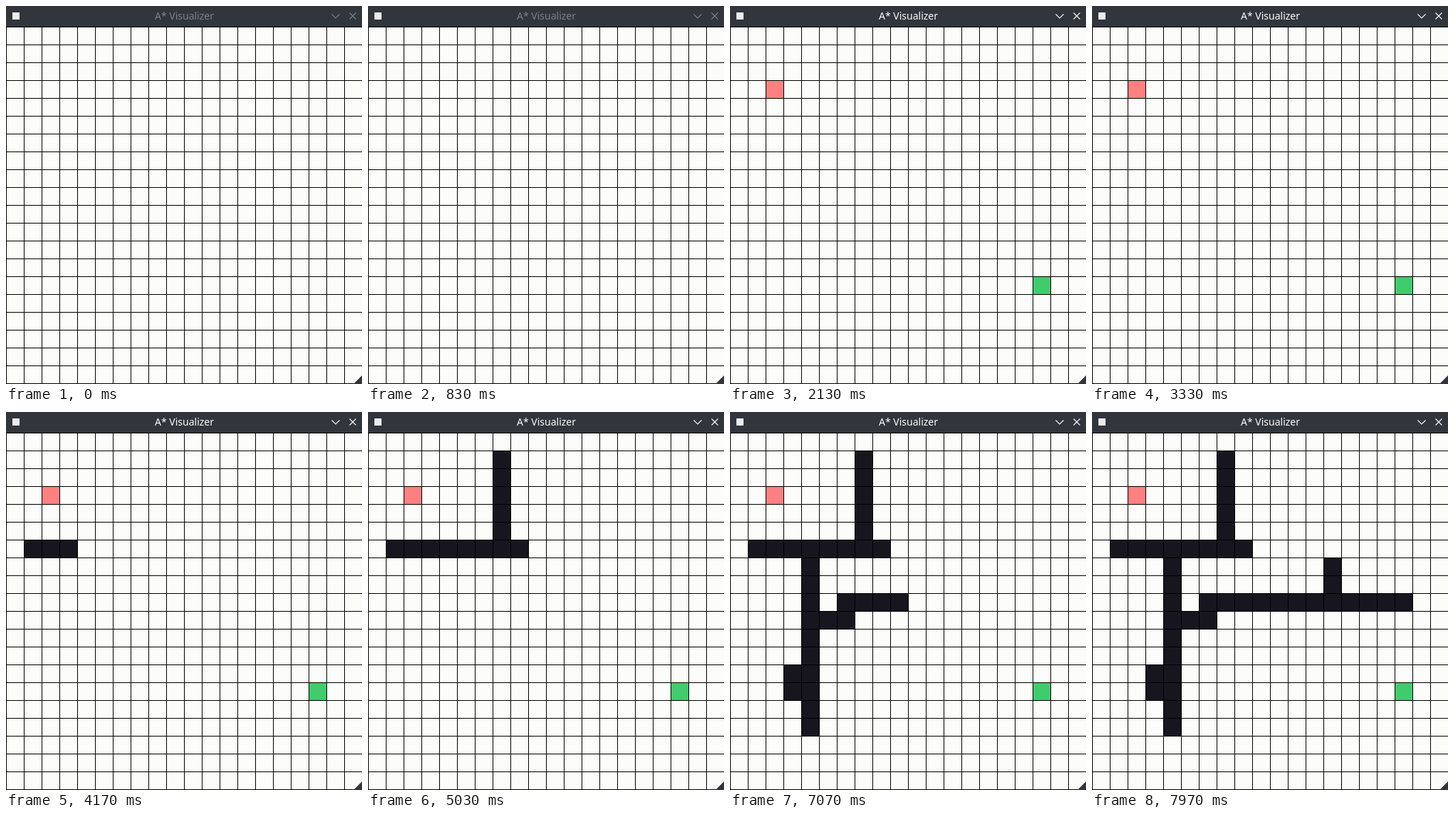
An HTML page with a canvas for the animation above (8000 ms loop, 500 px wide and 530 px high).

```html
<!DOCTYPE html>
<html lang="en">
<head>
<meta charset="utf-8">
<title>A* Visualizer</title>
<style>
  html, body { margin: 0; width: 100%; height: 100%; overflow: hidden; background: #fcfdfa; }
  canvas { display: block; }
</style>
</head>
<body>
<canvas id="stage" width="500" height="530"></canvas>
<script>
const ctx = document.getElementById('stage').getContext('2d');
const LOOP = 8000, CELL = 25, BAR = 29;
const COLOR = {
  bar: '#31363d', paper: '#fcfdfa', line: '#000000',
  wall: '#17161f', start: '#ff8080', goal: '#40cc6c'
};

// Each stroke: begin and end time, then the corner cells the pointer drags through.
const strokes = [
  [4030, 4430, [[1, 6], [8, 6]]],
  [4640, 4900, [[7, 5], [7, 1]]],
  [5530, 6230, [[4, 7], [4, 13], [3, 13], [3, 14], [4, 14], [4, 16]]],
  [6800, 7450, [[5, 10], [6, 10], [6, 9], [17, 9]]],
  [7660, 7830, [[13, 8], [13, 7]]]
];

function cellsAlong(points) {
  let [x, y] = points[0];
  const cells = [[x, y]];
  for (const [tx, ty] of points.slice(1)) {
    while (x !== tx || y !== ty) {
      x += Math.sign(tx - x);
      y += Math.sign(ty - y);
      cells.push([x, y]);
    }
  }
  return cells;
}

const walls = strokes.flatMap(([from, to, points]) => {
  const cells = cellsAlong(points);
  return cells.map(([x, y], i) => ({ x, y, at: from + (to - from) * i / (cells.length - 1) }));
});

function fillCell(x, y, color) {
  ctx.fillStyle = color;
  ctx.fillRect(x * CELL, BAR + y * CELL, CELL, CELL);
}

function polyline(...points) {
  ctx.beginPath();
  points.forEach(([x, y]) => ctx.lineTo(x, y));
  ctx.stroke();
}

function drawBar(focus) {
  ctx.fillStyle = COLOR.bar;
  ctx.fillRect(0, 0, 500, BAR);

  ctx.fillStyle = '#ececec';
  ctx.fillRect(9, 9, 10, 10);

  const mix = (a, b) => Math.round(a + (b - a) * focus);
  const ink = `rgb(${mix(126, 252)},${mix(130, 252)},${mix(134, 252)})`;
  ctx.fillStyle = ink;
  ctx.font = '14px "Noto Sans", sans-serif';
  ctx.textAlign = 'center';
  ctx.fillText('A* Visualizer', 250.5, 19);

  ctx.strokeStyle = ink;
  ctx.lineWidth = 1.1;
  polyline([457.5, 11.5], [463, 17], [468.5, 11.5]);
  polyline([482.5, 9.5], [491.5, 18.5]);
  polyline([491.5, 9.5], [482.5, 18.5]);
}

function drawGrid() {
  ctx.fillStyle = COLOR.line;
  for (let i = 0; i <= 20; i++) {
    ctx.fillRect(i * CELL, BAR, 1, 501);
    ctx.fillRect(0, BAR + i * CELL, 500, 1);
  }
}

function drawGrip() {
  ctx.fillStyle = COLOR.bar;
  ctx.beginPath();
  ctx.moveTo(500, 518);
  ctx.lineTo(500, 530);
  ctx.lineTo(488, 530);
  ctx.fill();
}

function draw(t) {
  ctx.fillStyle = COLOR.paper;
  ctx.fillRect(0, 0, 500, 530);
  if (t >= 900) fillCell(2, 3, COLOR.start);
  if (t >= 1370) fillCell(17, 14, COLOR.goal);
  for (const w of walls) if (t >= w.at) fillCell(w.x, w.y, COLOR.wall);
  drawGrid();
  drawGrip();
  drawBar(Math.min(1, Math.max(0, (t - 870) / 150)));
}

const began = performance.now();
function tick() {
  draw((performance.now() - began) % LOOP);
  requestAnimationFrame(tick);
}
tick();
</script>
</body>
</html>
```
